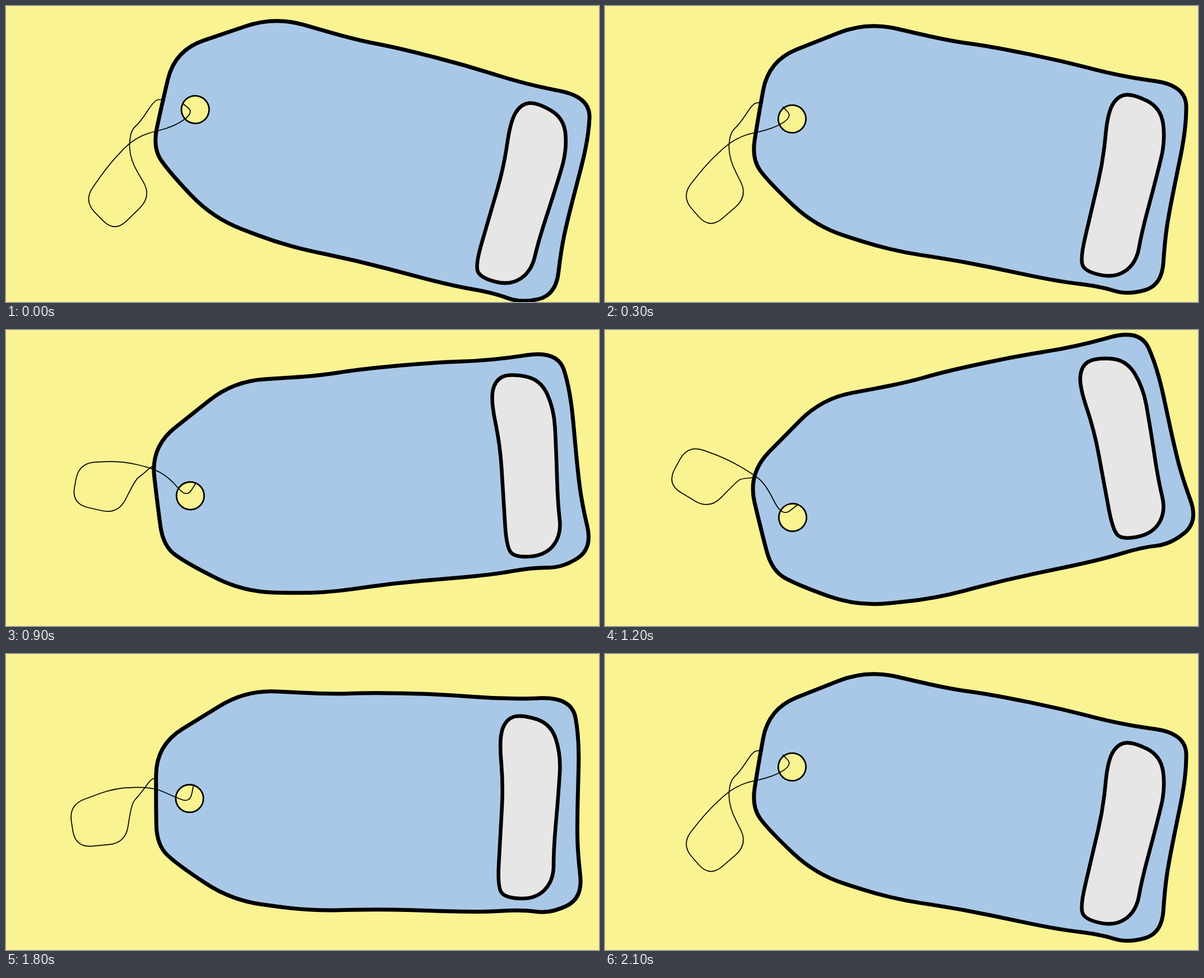
An HTML page that plays this animation: 1058 by 529 pixels, repeating every 2400 ms.

```html
<!DOCTYPE html>
<html lang="en">
<head>
<meta charset="utf-8">
<title>Swinging tag</title>
<style>
  html, body { margin: 0; width: 100%; height: 100%; overflow: hidden; background: #f9f392; }
  svg { display: block; width: 100%; height: 100%; stroke: #000; stroke-linejoin: round; }
</style>
</head>
<body>
<svg viewBox="0 0 1058 529">
  <g id="tag">
    <path id="body" fill="#a9c8e7" stroke-width="7"/>
    <circle cx="327.5" cy="258.2" r="24.7" fill="#f9f392" stroke-width="2.8"/>
    <path id="label" fill="#e6e6e6" stroke-width="6.6"/>
  </g>
  <path id="string" fill="none" stroke-width="1.7"/>
</svg>
<script>
const STEP = 300;
const PIVOT = [652, 266];

// Tag angle and string bend (1 = hanging, 0 = level, -1 = raised).
const SWING = [[13.05, 1], [10.03, 0.9], [0, 0], [-6.73, -0.5], [-13.65, -1]];
const CYCLE = [...SWING, ...SWING.slice(1, -1).reverse()];

const BODY = [
  [428, 64], [580, 72], [650, 69], [780, 72], [890, 81], [1009, 77],
  [1023, 150], [1019, 300], [1020, 355], [1029, 436], [972, 464], [920, 457],
  [845, 461.5], [670, 456], [540, 459], [402, 440], [308, 378], [269, 342],
  [267.5, 270], [268, 163]
];
const LABEL = [
  [880, 150], [892, 117], [918, 108], [972, 124], [990, 180], [986, 245],
  [977, 350], [977, 405], [945, 438], [890, 436], [877, 415], [887, 235]
];

// Matching corners of the string, from the hole round the loop to the tag's edge.
const HANGING = [
  [315, 174], [335, 190], [302, 215], [232, 233], [186, 280], [138, 348], [194, 405],
  [260, 340], [220, 272], [221, 224], [240, 207], [265, 168], [278, 167]
];
const LEVEL = [
  [335, 233], [328, 266], [298, 254], [262, 238], [195, 239], [112, 270], [124, 346],
  [213, 338], [224, 268], [234, 256], [245, 243], [257, 226], [264, 222]
];
const RAISED = [
  [344, 312], [316, 334], [286, 275], [262, 256], [215, 229], [148, 205], [110, 275],
  [186, 321], [238, 268], [245, 266], [252, 265], [258, 264.5], [264, 264]
];

const mix = (p, q, t) => p.map((v, i) => v + (q[i] - v) * t);

// Polygon with each corner rounded, by at most half of either side.
function rounded(points, radius, closed) {
  const n = points.length;
  const toward = (p, q) =>
    mix(p, q, Math.min(0.5, radius / Math.hypot(q[0] - p[0], q[1] - p[1])));
  const corners = points.map((p, i) =>
    !closed && i % (n - 1) === 0 ? `${p}`
      : `${toward(p, points[(i + n - 1) % n])}Q${p} ${toward(p, points[(i + 1) % n])}`);
  return "M" + corners.join("L") + (closed ? "Z" : "");
}

const el = id => document.getElementById(id);
el("body").setAttribute("d", rounded(BODY, 55, true));
el("label").setAttribute("d", rounded(LABEL, 40, true));

function draw() {
  const [angle, bend] = CYCLE[Math.floor(performance.now() / STEP) % CYCLE.length];
  const end = bend > 0 ? HANGING : RAISED;
  const string = LEVEL.map((p, i) => mix(p, end[i], Math.abs(bend)));
  el("tag").setAttribute("transform", `rotate(${angle} ${PIVOT})`);
  el("string").setAttribute("d", rounded(string, 30, false));
  requestAnimationFrame(draw);
}
draw();
</script>
</body>
</html>
```
